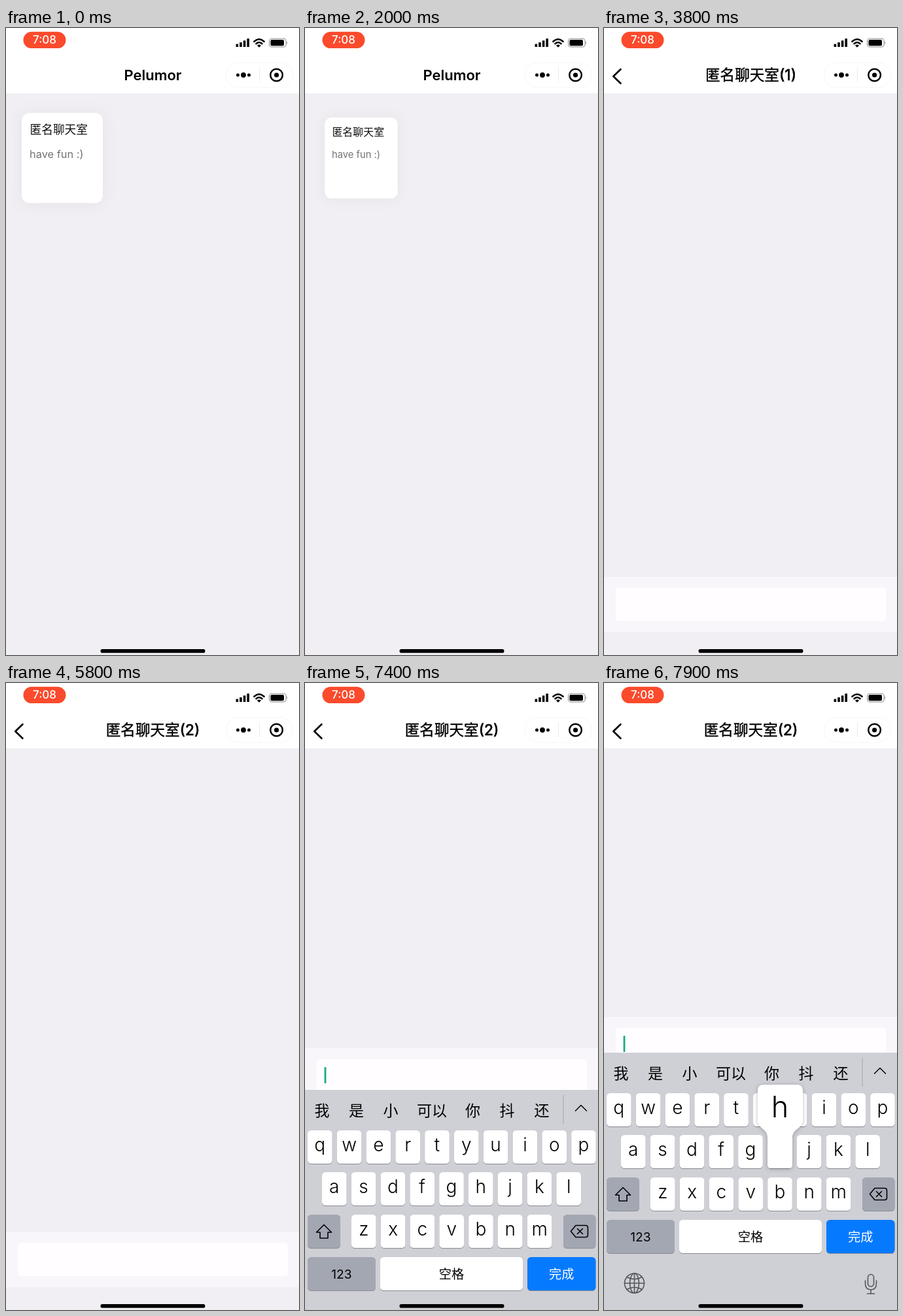
An HTML page that plays this animation: 448x960 px, repeating every 8 s.

```html
<!DOCTYPE html>
<html lang="zh-CN">
<head>
<meta charset="utf-8">
<title>Chat room</title>
<style>
  html, body { margin: 0; width: 100%; height: 100%; overflow: hidden; background: #f1eff3; }
  svg { display: block; width: 448px; height: 960px; }
  text { font-family: Inter, "Noto Sans CJK SC", "Noto Sans CJK", sans-serif; }
  .mid { text-anchor: middle; }
  .title { font-size: 22.6px; font-weight: 500; stroke: #000; stroke-width: .4px; }
  .line { fill: none; stroke: #000; stroke-linecap: round; stroke-linejoin: round; }
  .icon { fill: none; stroke: #54565c; stroke-width: 1.6; stroke-linecap: round; }
  .letter { font-size: 28px; font-weight: 350; }
  .word { font-size: 23px; font-weight: 400; }
  .label { font-size: 19.2px; font-weight: 400; }
  #card rect { filter: drop-shadow(0 1px 12px rgba(0, 0, 0, .05)); }
  #room { filter: drop-shadow(-2px 0 5px rgba(0, 0, 0, .08)); }
  #popup path { filter: drop-shadow(0 1px 3px rgba(0, 0, 0, .25)); }
</style>
</head>
<body>
<svg viewBox="0 0 448 960">
  <g id="home">
    <rect width="448" height="960" fill="#f1eff3"/>
    <rect width="448" height="100" fill="#fff"/>
    <text class="mid" x="224.5" y="80" font-size="22" font-weight="600">Pelumor</text>
    <g id="card">
      <rect x="24" y="130" width="124" height="138" rx="12" fill="#fff"/>
      <text x="36.5" y="161.7" font-size="17.7" fill="#111">匿名聊天室</text>
      <text x="36" y="198.5" font-size="16.4" fill="#737277">have fun :)</text>
    </g>
  </g>

  <g id="room">
    <rect width="448" height="960" fill="#f1eff3"/>
    <rect width="448" height="100" fill="#fff"/>
    <path class="line" d="M25.4 63.3L14.3 74L25.4 84.7" stroke-width="2.7" stroke-linecap="butt"/>
    <text id="title" class="mid title" x="224.5" y="80.3"></text>
    <g id="bar">
      <rect y="839" width="448" height="86" fill="#f8f6fa"/>
      <path d="M0 839.5H448" stroke="#eeecf0"/>
      <rect x="18" y="857" width="413" height="51" rx="5" fill="#fffdff"/>
      <rect id="caret" x="29.6" y="869" width="2.8" height="25" rx="1.2" fill="#18aa86"/>
    </g>
  </g>

  <g id="keyboard">
    <rect y="566" width="448" height="400" fill="#cfd0d6"/>
    <path d="M395 574V618" stroke="#b0b1b7" stroke-width="1.4"/>
    <path class="line" d="M413.5 598L422 589.5L430.5 598" stroke-width="1.5"/>
    <g id="words"></g>
    <g id="keys"></g>
    <path class="line" d="M29 772.5L40.5 784H35V793H23V784H17.5Z" stroke-width="1.6"/>
    <path class="line" d="M414 773.5H429Q432.5 773.5 432.5 777V788Q432.5 791.5 429 791.5H414L406.5 782.5ZM416.5 778.5L424.5 786.5M424.5 778.5L416.5 786.5" stroke-width="1.6"/>
    <g class="icon">
      <circle cx="46.5" cy="919" r="15"/>
      <ellipse cx="46.5" cy="919" rx="7" ry="15"/>
      <path d="M46.5 904V934M31.5 919H61.5M35 909.5Q46.5 916 58 909.5M35 928.5Q46.5 922 58 928.5"/>
      <rect x="403.5" y="905.5" width="9" height="18.5" rx="4.5"/>
      <path d="M399.5 915V919Q399.5 929 408 929T416.5 919V915M408 929V935M402.5 935H413.5"/>
    </g>
    <g id="popup">
      <path fill="#fff" d="M244 615H295Q304 615 304 624V669C304 683 288 682 288 696V738Q288 743 283 743H255Q250 743 250 738V696C250 682 235 683 235 669V624Q235 615 244 615Z"/>
      <text class="mid" x="269" y="664.8" font-size="45" font-weight="300">h</text>
    </g>
  </g>

  <g id="status">
    <rect x="26.5" y="5.7" width="65" height="25.4" rx="12.7" fill="#fb4a2c"/>
    <text class="mid" x="59" y="24.3" font-size="17" font-weight="500" fill="#fff">7:08</text>
    <path d="M353.4 29V24.5M359 29V22M364.6 29V19.3M370.2 29V16.2" stroke="#000" stroke-width="3.6"/>
    <path class="line" d="M379.4 20.7Q387 13.8 394.6 20.7M382.5 24Q387 20 391.5 24" stroke-width="2.6" stroke-linecap="butt"/>
    <path d="M387 29.8L383.9 26.7Q387 24.2 390.1 26.7Z"/>
    <rect x="402.6" y="16.2" width="25.6" height="12.8" rx="3.8" fill="none" stroke="#8b8b8d" stroke-width="1.1"/>
    <rect x="404.5" y="18" width="20.5" height="9.2" rx="2"/>
    <path d="M429.3 20.5Q431.3 22.6 429.3 24.7Z" fill="#8b8b8d"/>
    <rect x="336.5" y="53" width="102" height="38" rx="19" fill="#fff" stroke="#f7f6f8"/>
    <path d="M387.5 60V83" stroke="#ececee"/>
    <circle cx="354.5" cy="72" r="2.5"/>
    <circle cx="363" cy="72" r="3.9"/>
    <circle cx="371.5" cy="72" r="2.5"/>
    <circle cx="413.6" cy="72" r="9.3" fill="none" stroke="#000" stroke-width="2.5"/>
    <circle cx="413.6" cy="72" r="3.6"/>
    <rect x="144.5" y="951" width="160" height="5.7" rx="2.8"/>
  </g>
</svg>
<script>
  const $ = id => document.getElementById(id);
  const NS = 'http://www.w3.org/2000/svg';
  const LOOP = 8000, STEP = 100;

  function add(parent, tag, attrs, text = '') {
    const el = document.createElementNS(NS, tag);
    for (const name in attrs) el.setAttribute(name, attrs[name]);
    el.textContent = text;
    return parent.appendChild(el);
  }

  function key(x, y, w, fill, text, style, color = '#000') {
    const box = { x, y, width: w, height: 51, rx: 5.5 };
    add($('keys'), 'rect', { ...box, y: y + 1, fill: '#898b91' });
    add($('keys'), 'rect', { ...box, fill });
    const base = style === 'letter' ? 32.4 : 33;
    return add($('keys'), 'text', { class: 'mid ' + style, x: x + w / 2, y: y + base, fill: color }, text);
  }

  const rows = [['qwertyuiop', 4, 628], ['asdfghjkl', 26, 692], ['zxcvbnm', 71, 757]];
  for (const [letters, x, y] of rows)
    [...letters].forEach((c, i) => key(x + i * 44.8, y, 37.6, '#fff', c, 'letter'));

  const GREY = '#a3a7b2';
  key(4, 757, 50, GREY, '', 'label');
  key(395, 757, 49.5, GREY, '', 'label');
  key(4, 822, 104, GREY, '123', 'label');
  key(115, 822, 218, '#fff', '空格', 'label');
  key(340, 822, 104.5, '#067aff', '完成', 'label', '#fff');

  const words = [['我', 26], ['是', 78.5], ['小', 131], ['可以', 194], ['你', 256.5], ['抖', 309], ['还', 362]];
  for (const [word, x] of words)
    add($('words'), 'text', { class: 'mid word', x, y: 606 }, word);

  const progress = (t, start, length) => Math.min(1, Math.max(0, (t - start) / length));
  const easeOut = p => 1 - Math.pow(1 - p, 2.78);
  const move = (id, x, y) => $(id).setAttribute('transform', `translate(${x} ${y})`);
  const show = (id, on) => $(id).style.display = on ? '' : 'none';

  function render(t) {
    const press = progress(t, 1800, 200) - progress(t, 2200, 200);
    $('card').setAttribute('transform', `translate(86 199) scale(${1 - 0.1 * press}) translate(-86 -199)`);

    const push = easeOut(progress(t, 2300, 450));
    move('home', -134 * push, 0);
    move('room', 448 * (1 - push), 0);
    show('room', push > 0);
    $('title').textContent = `匿名聊天室(${t < 4800 ? 1 : 2})`;

    // Whole pixels keep the key edges sharp while the keyboard rises.
    const rise = easeOut(progress(t, 7200, 400));
    move('bar', 0, Math.round(-329 * rise));
    move('keyboard', 0, Math.round(394 * (1 - rise)));
    show('keyboard', rise > 0);
    show('caret', rise > 0);
    show('popup', t >= 7850);
  }

  function tick() {
    render(Math.floor((performance.now() + 4) / STEP) * STEP % LOOP);
    requestAnimationFrame(tick);
  }
  tick();
</script>
</body>
</html>
```
